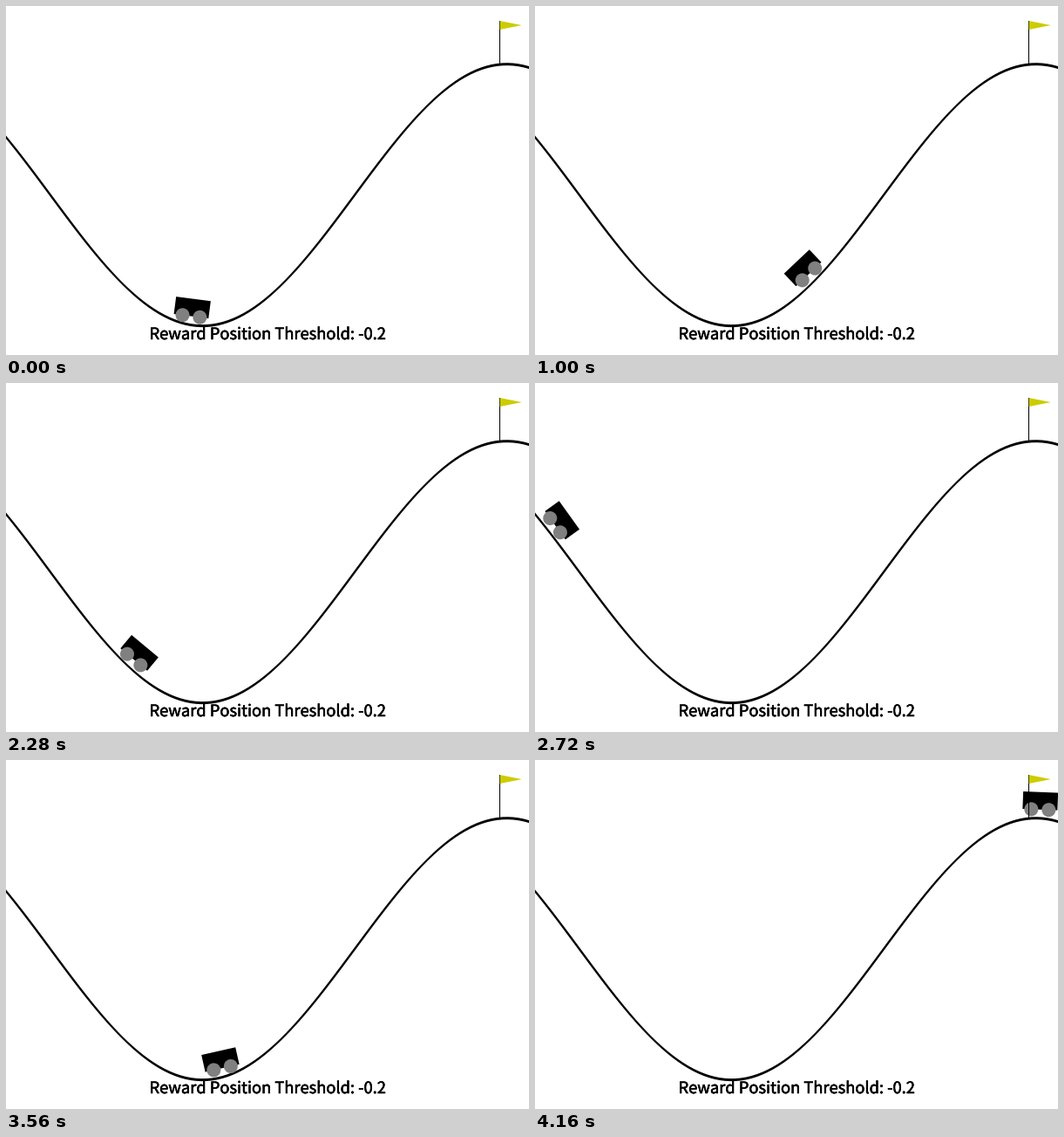
Animation, 600 px wide and 400 px high, one loop 4200 ms. Source, as a matplotlib script:

```python
import numpy as np
import matplotlib.pyplot as plt
from matplotlib import patheffects
from matplotlib.animation import FuncAnimation
from matplotlib.patches import Circle, Polygon
from matplotlib.transforms import Affine2D

W, H, DPI = 600, 400, 100
FRAMES, INTERVAL = 105, 40
STEPS_PER_FRAME = 1.2
X_MIN, X_MAX, GOAL = -1.2, 0.6, 0.5
SCALE = W / (X_MAX - X_MIN)
CLEARANCE = 10
TRACK_WIDTH = 3
PX = 72 / DPI  # points per pixel


def to_px(x):
    return (x - X_MIN) * SCALE


def height(x):
    return (0.45 * np.sin(3 * x) + 0.55) * SCALE


def drive(steps):
    """Mountain-car physics: push right, back up to the wall, then climb."""
    x, v = -0.5665, 0.0
    path = [x, x]
    for step in range(2, steps):
        push = -1 if 50 < step <= 86 else 1
        v += 0.001 * push - 0.0025 * np.cos(3 * x)
        v = min(max(v, -0.07), 0.07)
        x += v
        if x <= X_MIN:
            x, v = X_MIN, 0.0
        path.append(x)
    return path


path = drive(int(FRAMES * STEPS_PER_FRAME) + 1)

fig = plt.figure(figsize=(W / DPI, H / DPI), dpi=DPI, facecolor="white")
ax = fig.add_axes([0, 0, 1, 1])
ax.set_xlim(0, W)
ax.set_ylim(0, H)
ax.axis("off")

# The track is equally thick along its minor axis, so thinner on the diagonals.
xs = np.linspace(X_MIN, X_MAX, 100)
slope = 1.35 * np.cos(3 * xs)
half = TRACK_WIDTH / 2 * np.maximum(1, np.abs(slope))
ax.fill_between(to_px(xs), height(xs) - half, height(xs) + half,
                color="black", lw=0, snap=False, zorder=1)

body = Polygon([(-20, CLEARANCE), (-20, CLEARANCE + 20),
                (20, CLEARANCE + 20), (20, CLEARANCE)],
               fc="black", ec="none", snap=False, zorder=2)
wheels = [Circle((dx, CLEARANCE), 8, fc="#808080", ec="none", zorder=3)
          for dx in (10, -10)]
car = [body, *wheels]
for part in car:
    ax.add_patch(part)

flag_x, foot = to_px(GOAL), height(GOAL)
top = foot + 50
ax.plot([int(flag_x)] * 2, [foot, top], color="black", lw=PX,
        antialiased=False, solid_capstyle="butt", zorder=4)
ax.add_patch(Polygon([(flag_x, top), (flag_x, top - 10), (flag_x + 25, top - 5)],
                     fc="#cccc00", ec="none", snap=False, zorder=5))

ax.text(W / 2, 18, "Reward Position Threshold: -0.2", ha="center",
        va="baseline", color="black", family="Noto Sans CJK JP",
        weight="medium", size=18.3 * PX, zorder=6,
        path_effects=[patheffects.withStroke(linewidth=0.4, foreground="black")])


def update(i):
    x = path[int(i * STEPS_PER_FRAME + 0.5)]
    pose = Affine2D().rotate(np.cos(3 * x)).translate(to_px(x), height(x))
    for part in car:
        part.set_transform(pose + ax.transData)
    return car


anim = FuncAnimation(fig, update, frames=FRAMES, interval=INTERVAL,
                     init_func=lambda: update(0), repeat=True,
                     repeat_delay=0, blit=False)
plt.show()
```
